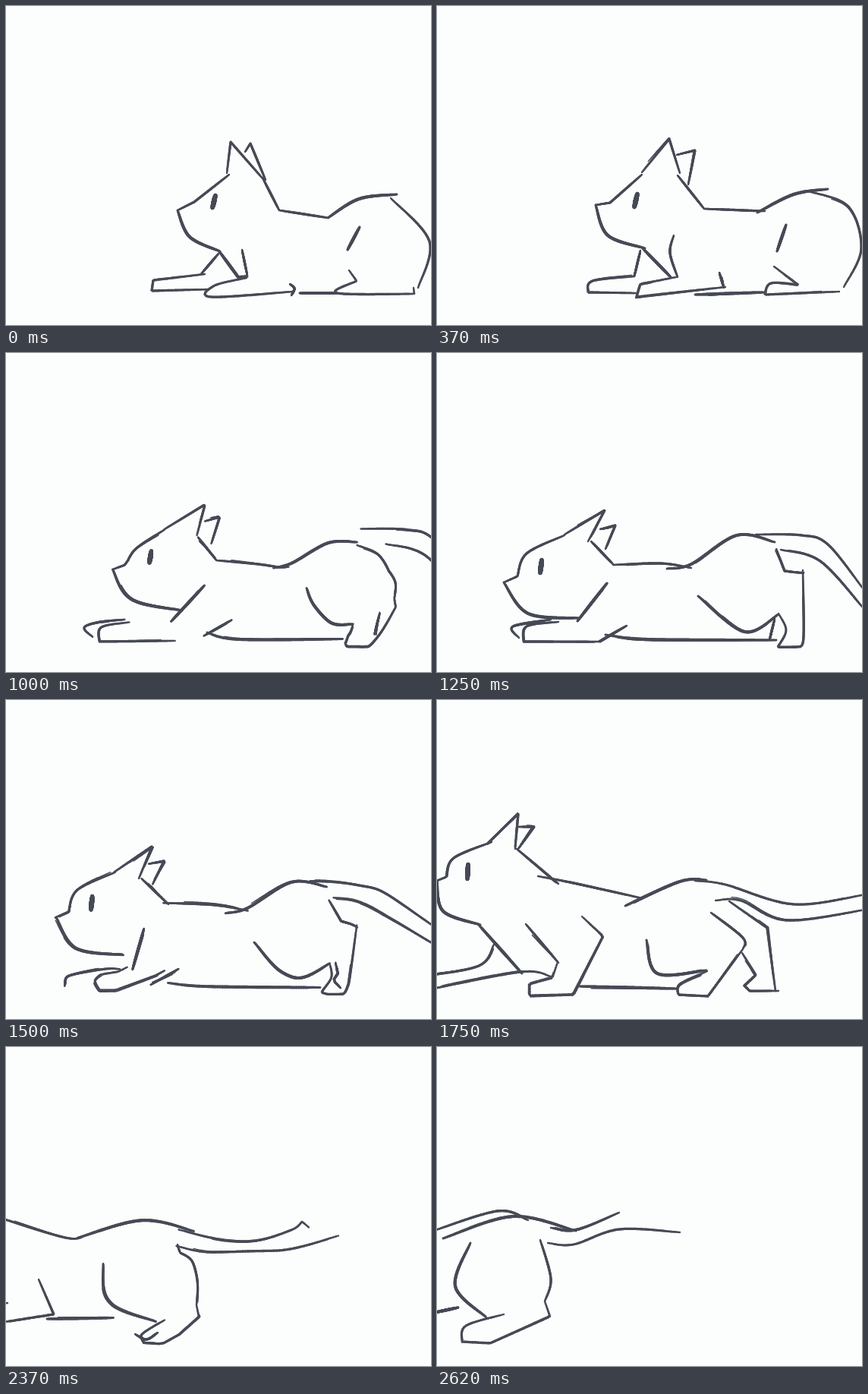
Write an HTML page with a canvas that moves like this. It is 560 px wide and 420 px high and loops after 3 s.

```html
<!DOCTYPE html>
<html lang="en">
<head>
<meta charset="utf-8">
<title>Stretching cat</title>
<style>
html, body { margin: 0; width: 100%; height: 100%; overflow: hidden; background: #fcfefd; }
canvas { display: block; }
</style>
</head>
<body>
<canvas id="stage" width="560" height="420"></canvas>
<script>
const ctx = document.getElementById('stage').getContext('2d');
const SAMPLES = 64;
const BOLD = /jaw|chest$|back2|belly|hind/;

// Key points of each brush stroke; "!" marks a sharp corner.
const lying = {
  earA: '291,220 296,179! 339,228',
  earB: '315,192 322,181! 342,229',
  neck: '338,226 360,269',
  head: '294,222 248,258! 226,269',
  jaw: '226,269 242,304 282,323',
  eye: '276,249 272,266',
  chest: '281,323 306,357! 318,356',
  chest2: '311,321 318,355',
  farleg: '280,326 257,353',
  pawF: '262,353 194,361! 192,375! 268,373',
  pawN: '317,358 275,368 270,383 378,376',
  hook: '374,366 380,372 376,381',
  back: '360,269 425,279',
  back2: '424,279 465,254 515,248',
  rump: '507,253 558,310 543,371',
  belly: '387,378 436,378',
  hind: '466,291 450,321',
  foot: '537,371 538,379! 436,378 462,362! 452,348'
};

const wakeful = {
  earA: '270,219 306,175! 320,220',
  earB: '316,196 340,190! 331,235',
  neck: '317,223 352,267',
  head: '270,222 228,259! 209,262',
  jaw: '209,262 225,302 274,319',
  eye: '264,247 260,265',
  chest: '271,319 308,357',
  chest2: '312,302 307,325 317,357',
  farleg: '268,322 260,356',
  pawF: '260,356 205,362 199,377! 262,378',
  pawN: '315,357 268,366! 263,383! 380,370',
  hook: '372,351 378,371',
  back: '352,267 432,270',
  back2: '422,272 470,248 515,241',
  rump: '490,244 542,264 559,320 536,370',
  belly: '340,380 430,377',
  hind: '460,288 448,323',
  foot: '530,376 432,380! 440,365 476,367! 444,343'
};

const reaching = {
  earA: '248,226 305,191! 304,232',
  earB: '309,211 328,205! 319,244',
  neck: '303,237 322,267',
  head: '250,225 213,263! 193,268',
  jaw: '193,268 210,305 277,329',
  eye: '245,249 242,263',
  chest: '299,309 250,354',
  pawF: '246,349 195,335 169,357 200,358',
  pawN: '198,361 245,378 330,364',
  toe: '203,367 208,374! 235,375',
  back: '322,267 392,283 410,280',
  back2: '402,282 440,266 480,249',
  rump: '478,248 530,258 558,310 541,356',
  belly: '308,365 335,377 440,375',
  hind: '448,299 440,320 463,370',
  foot: '541,356 545,368! 500,385 440,385! 442,375! 465,370'
};

const crouching = {
  earA: '168,239 221,207! 199,248',
  earB: '215,232 235,227! 222,258',
  neck: '203,248 232,278',
  head: '168,240 118,264 106,294! 88,302',
  jaw: '88,302 120,343 187,349',
  eye: '138,272 136,290',
  chest: '224,303 185,353',
  pawF: '150,351 100,360 108,375',
  pawN: '160,354 118,360 114,380! 215,380',
  elbow: '250,359 213,380',
  back: '232,279 295,277 335,283',
  back2: '303,284 335,278 395,240 445,249',
  tail: '420,239 480,240 515,252 562,311',
  tail2: '453,259 505,274 562,336',
  rump: '447,258 458,287! 483,290',
  belly: '222,371 280,377 447,378',
  hind: '344,320 405,367 450,344',
  foot: '482,286 483,375 475,387! 449,387! 460,365 450,343',
  foot2: '445,350 438,378'
};

const walking = {
  earA: '65,190 107,150! 103,196',
  earB: '107,167 128,167! 107,196',
  neck: '105,196 160,242',
  head: '72,187 22,208 12,233! -5,240',
  jaw: '0,238 8,278 57,296',
  eye: '41,216 40,236',
  chest: '55,296 112,360',
  chest2: '117,295 160,346',
  farleg: '75,322 55,350 -20,364',
  pawF: '150,364 110,358 -15,382',
  pawN: '159,345 152,366! 122,374! 122,390! 180,388! 219,311! 191,285',
  back: '133,232 180,241 270,261',
  back2: '248,271 320,239 355,237',
  tail: '340,238 380,243 470,269 565,256',
  tail2: '367,264 400,264 460,290 565,276',
  rump: '361,280 403,313 403,328',
  belly: '188,377 315,380',
  hind: '276,316 290,360 355,356',
  shin: '385,265 435,300! 446,383',
  foot: '403,328 357,390! 318,388! 320,374 356,357',
  foot2: '402,333 420,362! 405,376! 412,383! 450,383'
};

const leaving = {
  earA: '-5,185 16,147! 21,186',
  earB: '23,182 45,157! 43,189',
  neck: '22,190 85,225',
  back: '83,222 178,251 205,248',
  back2: '180,251 260,233 312,243',
  tail: '305,243 440,275 525,258 547,239! 558,257',
  tail2: '303,266 365,283 470,296 556,253',
  rump: '316,266 320,278! 347,283 360,345',
  hind: '212,313 240,360 330,367',
  foot: '360,345 357,380! 343,392! 320,390! 330,367',
  foot2: '270,378 285,385 300,376',
  belly: '113,366 255,370',
  chest: '-5,287 77,352',
  chest2: '79,262 61,310 80,340',
  farleg: '47,331 5,367 -10,367',
  pawF: '78,354 20,387! -10,387',
  toe: '102,337 78,340! 78,382! 98,360',
  pawN: '97,362 163,352! 143,306'
};

const gone = {
  ridge: '-5,242 80,216 120,228',
  back2: '8,252 100,223 183,242',
  tail: '150,238 183,241 240,218',
  tail2: '146,258 180,260 240,240 320,244',
  rump: '136,254 150,305 142,335',
  hind: '44,258 24,315 65,356',
  foot: '142,335 149,355! 70,390! 33,388! 38,367 88,352',
  belly: '-5,350 28,343'
};

// at: step of the pose; rough: sketch lines per stroke; the rest is the move to the next pose.
const poses = [
  { at: 0, art: lying, rough: 0, ease: 0.7, shift: [-12, -2] },
  { at: 3, art: wakeful, rough: 1, shift: [-18, 5] },
  { at: 6, art: reaching, rough: 0, pawEase: 0.1, shift: [-95, 15] },
  { at: 10, art: crouching, rough: 2, ease: 2, shift: [-90, -20] },
  { at: 14, art: walking, rough: 2, shift: [-85, 0] },
  { at: 17, art: leaving, rough: 1, shift: [-200, 0], cut: 1 },
  { at: 21, art: gone, rough: 1 }
];

const mix = (a, b, t) => a + (b - a) * t;

// Smooth curve through the points, broken at corners.
function spline(points) {
  const out = [points[0]];
  for (let i = 0; i < points.length - 1; i++) {
    const b = points[i], c = points[i + 1];
    const a = b.corner || !i ? b : points[i - 1];
    const d = c.corner ? c : points[i + 2] || c;
    for (let k = 1; k <= 12; k++) {
      const t = k / 12, s = 1 - t;
      const at = j => s * s * s * b[j] + 3 * s * s * t * (b[j] + (c[j] - a[j]) / 6)
        + 3 * s * t * t * (c[j] - (d[j] - b[j]) / 6) + t * t * t * c[j];
      out.push([at(0), at(1)]);
    }
  }
  return out;
}

function resample(line) {
  const length = [0];
  for (let i = 1; i < line.length; i++)
    length.push(length[i - 1] + Math.hypot(line[i][0] - line[i - 1][0], line[i][1] - line[i - 1][1]));
  const total = length[length.length - 1], out = [];
  for (let n = 0, i = 1; n <= SAMPLES; n++) {
    const want = total * n / SAMPLES;
    while (i < line.length - 1 && length[i] < want) i++;
    const t = (want - length[i - 1]) / (length[i] - length[i - 1] || 1);
    out.push([mix(line[i - 1][0], line[i][0], t), mix(line[i - 1][1], line[i][1], t)]);
  }
  return out;
}

function parse(text) {
  return resample(spline(text.split(' ').map(p => {
    const xy = p.replace('!', '').split(',').map(Number);
    xy.corner = p.endsWith('!');
    return xy;
  })));
}

for (const { art } of poses)
  for (const name in art) art[name] = parse(art[name]);

function brush(line, width) {
  for (let i = 1; i < line.length; i++) {
    const u = (i - 0.5) / (line.length - 1);
    ctx.lineWidth = width * (0.65 + 0.35 * Math.sqrt(Math.sin(Math.PI * u)));
    ctx.beginPath();
    ctx.moveTo(...line[i - 1]);
    ctx.lineTo(...line[i]);
    ctx.stroke();
  }
}

// Thin repeats of a long stroke that drift slightly away from it.
function sketch(line, count, seed) {
  const noise = k => Math.sin((seed + k) * 127.1) * 43758.5 % 1;
  for (let n = 0; n < count; n++) {
    const [x0, y0, x1, y1] = [1, 2, 3, 4].map(k => 2.5 * noise(k + 9 * n));
    const skip = Math.floor(Math.abs(noise(5 + 9 * n)) * SAMPLES / 3);
    brush(line.slice(skip, SAMPLES - skip / 2).map(([x, y], i) =>
      [x + mix(x0, x1, i / SAMPLES), y + mix(y0, y1, i / SAMPLES)]), 1.7);
  }
}

const moved = (line, [dx, dy], t) => line.map(([x, y]) => [x + dx * t, y + dy * t]);
const morph = (a, b, t) => a.map(([x, y], i) => [mix(x, b[i][0], t), mix(y, b[i][1], t)]);

function draw(step) {
  ctx.fillStyle = '#fcfefd';
  ctx.fillRect(0, 0, 560, 420);
  ctx.strokeStyle = '#474b56';
  ctx.lineCap = 'round';
  const from = poses.filter(p => p.at <= step).pop();
  const to = poses[poses.indexOf(from) + 1] || from;
  const { ease = 1, pawEase = ease, shift = [0, 0], cut = 0.5 } = from;
  const part = (step - from.at) / (to.at - from.at || 1);
  const rough = Math.round(mix(from.rough, to.rough, part));
  [...new Set([...Object.keys(from.art), ...Object.keys(to.art)])].forEach((name, i) => {
    const a = from.art[name], b = to.art[name];
    const t = part ** (name.startsWith('paw') ? pawEase : ease);
    let line;
    if (a && b) line = morph(a, b, t);
    else if (a && t < cut) line = moved(a, shift, t);
    else if (b && t >= cut) line = moved(b, shift, t - 1);
    if (!line) return;
    brush(line, name === 'eye' ? 6.5 : BOLD.test(name) ? 4.2 : 3.3);
    if (name !== 'eye') sketch(line, rough, step * 40 + i);
  });
}

let shown = -1;
function tick(now) {
  const ms = now % 3000;
  let step = Math.min(21, 2 * Math.floor(ms / 250) + (ms % 250 >= 120 ? 1 : 0));
  if (step === 2) step = 1; // the second drawing is held twice as long
  if (step !== shown) draw(shown = step);
  requestAnimationFrame(tick);
}
tick(0);
</script>
</body>
</html>
```
